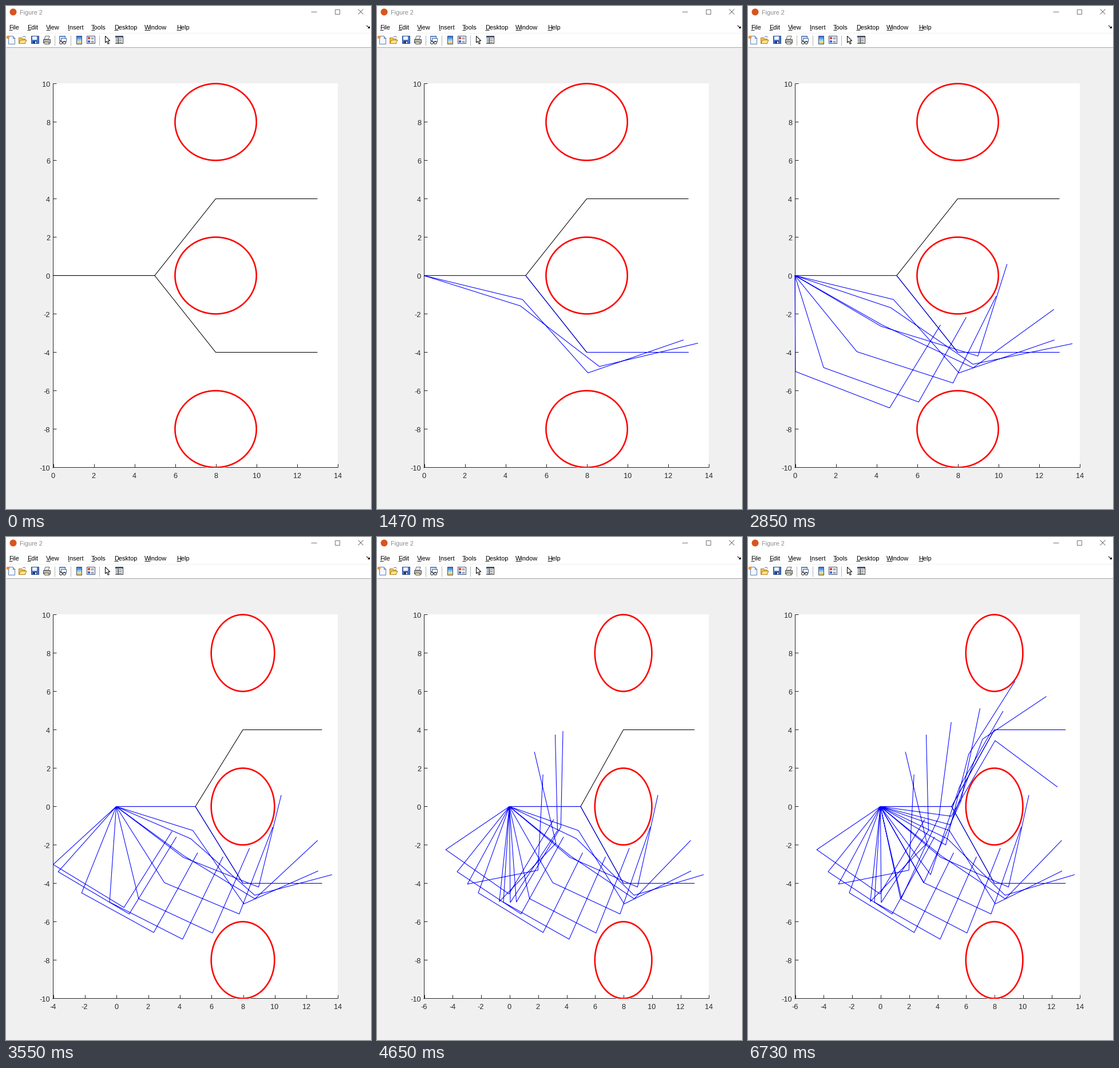
Recreate the animation shown at these times as a matplotlib script. Size 638 by 878 pixels, loop 7740 ms.

```python
import math

import numpy as np
import matplotlib.pyplot as plt
from matplotlib.animation import FuncAnimation
from matplotlib.patches import Circle, Polygon, Rectangle

W, H, DPI = 638, 878, 100
PX = 72 / DPI                      # one pixel in points
LEFT, RIGHT, TOP, BOTTOM = 82, 580, 135.5, 805.5
INTERVAL, LOOP = 45, 7740
START, STEP, LAST = 1010, 77.3, 74  # motion start (ms), step (ms), last step
LINK = 5
INK, BLUE = "#262626", "#0000ff"

# absolute angles of the three links at each waypoint, in degrees
WAYPOINTS = np.array([
    (0, -53.13, 0), (-14.45, -49.9, 20.1), (-19.6, -36.1, 12.4),
    (-31, -26.5, 37.5), (-32, -18, 73.4), (-52.5, -19.05, 64.9),
    (-73.6, -21, 62.1), (-94.8, -22.7, 59.3), (-115.9, -24.4, 56.3),
    (-137.2, -26.1, 53.4), (-153.3, -27.5, 51), (-126.1, 8.3, 85.9),
    (-98.1, 37.4, 107.6), (-89.3, 48.5, 91.8), (-72.8, 58.2, 80.1),
    (-52.5, 58.5, 74.5), (-45.2, 66.1, 52.2), (-23.6, 71.1, 49.5),
    (-10.9, 63.1, 26.4), (-5.8, 52, -28.9), (0, 53.13, 0)])
# progress along the waypoints at some steps
PACE_STEP = [0, 6, 24, 33, 47, 60, 64, 74]
PACE_POS = [0, 1.78, 6.76, 9.35, 13.3, 16.88, 18.02, 20]

# the small margin keeps the pixel size from rounding down
fig = plt.figure(figsize=((W + 0.01) / DPI, (H + 0.01) / DPI), dpi=DPI,
                 facecolor="#f0f0f0")
ax = fig.add_axes([0, 0, 1, 1])
ax.set_xlim(0, W)
ax.set_ylim(H, 0)
ax.axis("off")


def rect(x, y, w, h, fc, ec="none", lw=1, z=1):
    return ax.add_patch(Rectangle((x, y), w, h, fc=fc, ec=ec, lw=lw * PX, zorder=z))


def poly(pts, fc, ec="none", lw=1):
    ax.add_patch(Polygon(pts, fc=fc, ec=ec, lw=lw * PX, zorder=2))


def line(xs, ys, color, lw=1.0, z=3):
    return ax.plot(xs, ys, color=color, lw=lw * PX, zorder=z,
                   solid_capstyle="butt", solid_joinstyle="round")[0]


def label(x, y, text, size, color="black", ha="left", va="center_baseline"):
    return ax.text(x, y, text, fontsize=size * PX, color=color, ha=ha, va=va,
                   family="Liberation Sans", zorder=4)


def draw_window():
    rect(0, 0, W, 72, "white")
    line([0, W], [47.5, 47.5], "#f0f0f0")
    line([0, W], [72.5, 72.5], "#a8a8a8")
    ax.add_patch(Circle((12.5, 10.5), 6, fc="#d9541e", ec="none", zorder=2))
    label(24, 11, "Figure 2", 10.8, "#8c8c8c")
    grey = "#777777"
    line([533, 543], [10.5, 10.5], grey)
    rect(574.5, 6.5, 8, 8, "none", grey)
    line([615.5, 624.5], [5.5, 14.5], grey)
    line([615.5, 624.5], [14.5, 5.5], grey)
    menus = [("File", 5, 6), ("Edit", 37, 6), ("View", 70, 7), ("Insert", 108, 3),
             ("Tools", 149, 6), ("Desktop", 189, 7), ("Window", 242, 10), ("Help", 298, 8)]
    for name, x, w in menus:
        label(x, 36.5, name, 11)
        line([x, x + w], [42.5, 42.5], "black", 0.9)
    line([630, 635], [34, 38], "black")
    poly([(636, 35), (636, 39.5), (631.5, 39.5)], "black")


def draw_toolbar():
    for x in (84.5, 112.5, 162.5):
        line([x, x], [51, 69], "#b4b4b4")
    # new page
    poly([(4.5, 52.5), (11.5, 52.5), (15.5, 56.5), (15.5, 66.5), (4.5, 66.5)],
         "#f4f8fe", "#5d7fb0")
    line([11.5, 11.5, 15.5], [52.5, 56.5, 56.5], "#5d7fb0")
    ax.add_patch(Circle((3.5, 54.5), 2.8, fc="#f0913a", ec="none", zorder=4))
    # folder
    poly([(22.5, 65.5), (22.5, 55.5), (27.5, 55.5), (29, 57.5), (33.5, 57.5), (33.5, 65.5)],
         "#f0c552", "#b57d1c")
    poly([(22.5, 65.5), (25.5, 59.5), (36, 59.5), (33, 65.5)], "#fde58c", "#b57d1c")
    line([29, 32, 34.5], [54, 52.8, 55], "#4e79bd")
    # disk
    rect(43.5, 52.5, 13, 13, "#4a76c9", "#27488f", z=2)
    rect(46, 53, 8, 6, "#eef4ff", z=3)
    rect(46.5, 61, 7, 4.5, "#23396e", z=3)
    rect(51, 62, 2, 3, "white", z=4)
    # printer
    poly([(67, 58), (69, 52.5), (76, 52.5), (74, 58)], "white", "#666666")
    rect(64.5, 58.5, 12, 5.5, "#b9b9b9", "#4a4a4a", z=2)
    poly([(66, 63), (74, 63), (76, 66.5), (68, 66.5)], "#f3e9c0", "#555555")
    # linked windows
    rect(92.5, 52.5, 10, 8, "#dfeafa", "#3e5f96", z=2)
    rect(92.5, 52.5, 10, 2, "#5b86c9", z=3)
    rect(95.5, 56.5, 9, 6, "#f5f9ff", "#3e5f96", z=3)
    for x in (94, 100):
        ax.add_patch(Circle((x + 2, 64), 2.4, fc="none", ec="#444444",
                            lw=1.2 * PX, zorder=4))
    # colour bar
    for i, c in enumerate(("#4470d0", "#5f9fe6", "#8fd0ee", "#d8e8a8", "#f5c565")):
        rect(122.5, 52.5 + 2.7 * i, 9, 2.8, c, z=2)
    rect(122.5, 52.5, 9, 13.5, "none", "#3a4f7c", z=3)
    # legend
    rect(140.5, 52.5, 14, 13, "white", "#3a4f7c", z=2)
    rect(142.5, 54.5, 4, 4, "#d8432f", z=3)
    rect(142.5, 60, 4, 4, "#3f66cf", z=3)
    for y in (55.5, 57.5, 61.5, 63.5):
        line([148, 153], [y, y], "#666666")
    # pointer
    poly([(173.5, 52.5), (173.5, 64), (176.2, 61.5), (178.2, 66.3), (180.2, 65.4),
          (178.2, 60.8), (181.8, 60.8)], "white", "black")
    # inspector
    rect(190.5, 52.5, 13, 13, "white", "#333333", z=2)
    rect(190.5, 52.5, 13, 2.5, "#44546e", z=3)
    rect(191, 55, 4.5, 10, "#cfd6e2", z=3)
    line([195.5, 195.5], [55, 65.5], "#333333", z=4)
    for y in (57.5, 60.5, 63.5):
        line([197, 202], [y, y], "#444444")
        line([192, 194.5], [y, y], "#666666", z=4)


def y_px(y):
    return 470.5 - np.asarray(y) * (BOTTOM - TOP) / 20


def x_px(x, low):
    return LEFT + (np.asarray(x) - low) * (RIGHT - LEFT) / (14 - low)


def joints(angles):
    a = np.radians(angles)
    xs = np.concatenate([[0], np.cumsum(LINK * np.cos(a)), [np.nan]])
    ys = np.concatenate([[0], np.cumsum(LINK * np.sin(a)), [np.nan]])
    return xs, ys


draw_window()
draw_toolbar()
rect(LEFT, 135, RIGHT - LEFT, 670.5, "white")
line([81.5, 81.5], [135, 806], INK, z=2)
line([81, 580], [805.5, 805.5], INK, z=2)
for v in range(-10, 11, 2):
    line([82, 88], [float(y_px(v))] * 2, INK, z=2)
    label(77, float(y_px(v)) + 1, str(v), 12.8, INK, "right")

x_ticks = line([], [], INK, z=2.5)
x_labels = [label(0, 819, str(v), 12.8, INK, "center") for v in range(-6, 15, 2)]

box = Rectangle((LEFT, 134.5), RIGHT - LEFT, 672, transform=ax.transData)
turn = np.linspace(0, 2 * math.pi, 181)
rings = []
for cy in (8, 0, -8):
    ys = y_px(cy + 2 * np.sin(turn))
    for color, lw, z in (("white", 4, 2.2), ("#ff0000", 2.6, 3)):
        ring = line(turn, ys, color, lw, z)
        ring.set_clip_path(box)
        rings.append(ring)

goals = [(joints(WAYPOINTS[i]), line([], [], "black", 1.05, 4)) for i in (0, -1)]
arms = line([], [], BLUE, 1.05, 5)


def poses_at(ms):
    """All arm poses visible at a time: passed waypoints and the moving arm."""
    step = min(math.floor((ms - START) / STEP + 0.5), LAST)
    if step < 0:
        return []
    pos = float(np.interp(step, PACE_STEP, PACE_POS))
    i = int(pos)
    poses = list(WAYPOINTS[:i + 1])
    if pos > i:
        poses.append(WAYPOINTS[i] + (pos - i) * (WAYPOINTS[i + 1] - WAYPOINTS[i]))
    return poses


def update(n):
    shapes = [joints(p) for p in poses_at((n + 0.5) * INTERVAL)]
    xs = np.concatenate([s[0] for s in shapes]) if shapes else np.zeros(1)
    ys = np.concatenate([s[1] for s in shapes]) if shapes else np.zeros(1)
    low = 2 * math.floor(np.nanmin(xs) / 2)

    arms.set_data(x_px(xs, low), y_px(ys))
    for (gx, gy), goal in goals:
        goal.set_data(x_px(gx, low), y_px(gy))
    for ring in rings:
        ring.set_xdata(x_px(8 + 2 * np.cos(turn), low))

    tx, ty = [], []
    for v, text in zip(range(-6, 15, 2), x_labels):
        text.set_visible(v >= low)
        if v >= low:
            x = float(x_px(v, low))
            text.set_x(x)
            tick = min(math.floor(x) + 0.5, 579.5)
            tx += [tick, tick, np.nan]
            ty += [799, 805, np.nan]
    x_ticks.set_data(tx, ty)
    return [arms]


anim = FuncAnimation(fig, update, frames=LOOP // INTERVAL, interval=INTERVAL,
                     repeat=True, repeat_delay=0, blit=False)
plt.show()
```
